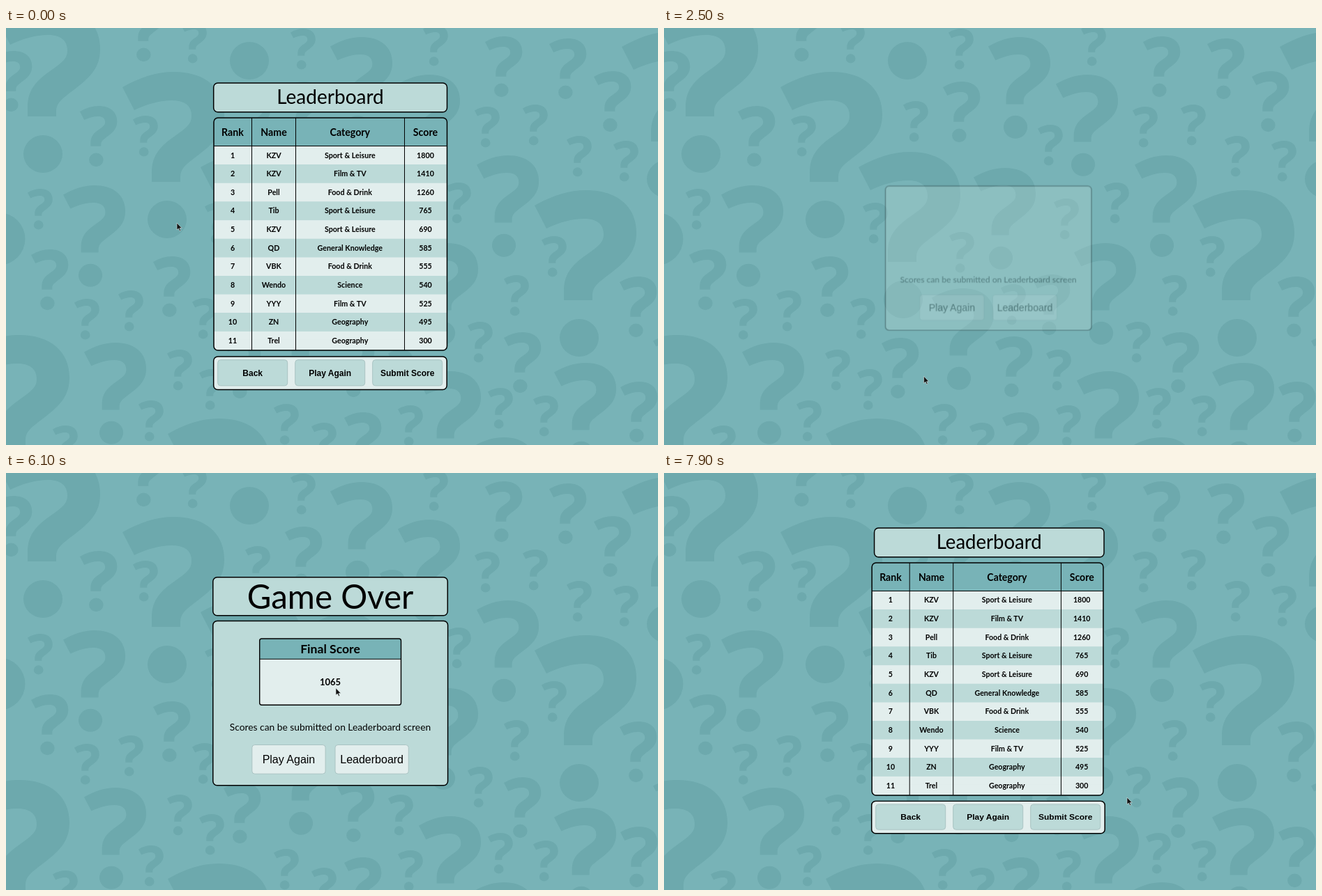
Recreate the animation shown at these times as an HTML page. Size 935 by 599 pixels, loop 8 s.

```html
<!DOCTYPE html>
<html lang="en">
<head>
<meta charset="utf-8">
<title>Quiz leaderboard</title>
<style>
  html, body { margin: 0; width: 100%; height: 100%; overflow: hidden; background: #78b3b7; }
  svg { display: block; position: absolute; left: 0; top: 0; overflow: hidden; }
  text { font-family: Lato, "Open Sans", sans-serif; text-anchor: middle; fill: #000; }
  .bold { font-weight: 700; }
  .ui { font-family: "Liberation Sans", Arial, sans-serif; }
  .moving { transform-box: fill-box; transform-origin: center; }
</style>
</head>
<body>
<svg id="stage" width="935" height="599" xmlns="http://www.w3.org/2000/svg"></svg>
<script>
const LOOP = 8000, STEP = 100;
const TEAL = '#78b3b7', SHADE = '#6da9ad', MINT = '#bcdad8', PALE = '#e2eeed', INK = '#000';
const stage = document.getElementById('stage');

function add(parent, tag, attrs = {}, text) {
  const el = document.createElementNS('http://www.w3.org/2000/svg', tag);
  for (const key in attrs) el.setAttribute(key, attrs[key]);
  if (text !== undefined) el.textContent = text;
  parent.appendChild(el);
  return el;
}
const group = (parent, cls = '') => add(parent, 'g', { class: cls });
const box = (parent, x, y, width, height, rx, fill, stroke = 'none', w = 1) =>
  add(parent, 'rect', { x, y, width, height, rx, fill, stroke, 'stroke-width': w });
const label = (parent, x, y, size, text, cls = '') =>
  add(parent, 'text', { x, y, 'font-size': size, class: cls }, text);
const line = (parent, d) => add(parent, 'path', { d, stroke: INK, 'stroke-width': 1, fill: 'none' });

// ---- Background of query glyphs, grouped by scale ----
const HOOK = 'M0 22C25 8 48 0 74 0C118 0 146 23 146 61C146 86 134 100 112 117' +
  'C90 134 83 138 83 152V158H42V145C42 120 54 107 74 93C94 79 99 74 99 63' +
  'C99 48 88 41 71 41C54 41 36 46 17 55Z';
const DOT = 'M36 212a28 27 0 1 0 56 0a28 27 0 1 0 -56 0Z';
const glyphs = [
  [1, '-11,-31 167,63 279,178 758,233 -55,441 232,561 285,-165 883,5'],
  [.61, '465,13 562,67 444,201 675,183 82,226 588,309 384,374 112,452 592,493 786,481 669,588'],
  [.365, '106,112 400,77 687,12 779,15 843,62 36,318 211,328 529,354 312,445 475,443 ' +
    '880,357 714,437 881,508 485,552 -16,33 174,-39'],
  [.245, '182,126 252,-8 408,1 598,-4 343,105 536,139 672,113 741,110 804,155 871,162 ' +
    '31,231 285,251 409,293 559,245 631,222 768,299 714,355 662,422 98,389 161,377 ' +
    '267,388 483,368 231,462 277,490 190,535 67,571 384,540 438,567 548,462 562,542 ' +
    '691,517 756,528 928,444']
];
box(stage, 0, 0, 935, 599, 0, TEAL);
for (const [scale, places] of glyphs)
  for (const place of places.split(' '))
    add(stage, 'path', { d: HOOK + DOT, fill: SHADE, transform: `translate(${place}) scale(${scale})` });
add(stage, 'circle', { cx: -10, cy: 303, r: 37.5, fill: SHADE });

// ---- Buttons with a hover state ----
function button(parent, x, y, w, h, fill, size, text, cls) {
  const face = box(parent, x, y, w, h, 4, fill, '#a9c3c2');
  label(parent, x + w / 2, y + h / 2 + size * .36, size, text, cls);
  return {
    hover(on) {
      face.setAttribute('fill', on ? TEAL : fill);
      face.setAttribute('stroke', on ? '#1d2b2c' : '#a9c3c2');
    },
    contains: (px, py) => px >= x && px <= x + w && py >= y && py <= y + h
  };
}

// ---- Leaderboard screen ----
const board = group(stage);
const boardTitle = group(board, 'moving');
box(boardTitle, 297.7, 79, 334.8, 41.7, 6, MINT, INK, 1.5);
label(boardTitle, 465, 109, 28, 'Leaderboard');

const table = group(board, 'moving');
const columns = [325, 384, 493.3, 601.5];
const rows = [
  ['KZV', 'Sport & Leisure', 1800], ['KZV', 'Film & TV', 1410], ['Pell', 'Food & Drink', 1260],
  ['Tib', 'Sport & Leisure', 765], ['KZV', 'Sport & Leisure', 690], ['QD', 'General Knowledge', 585],
  ['VBK', 'Food & Drink', 555], ['Wendo', 'Science', 540], ['YYY', 'Film & TV', 525],
  ['ZN', 'Geography', 495], ['Trel', 'Geography', 300]
];
const ROW = 26.64, TOP = 169.5;
box(table, 298, 129, 334.5, 334, 6, TEAL);
['Rank', 'Name', 'Category', 'Score'].forEach((t, i) => label(table, columns[i], 154.6, 14.2, t, 'bold'));
rows.forEach((row, i) => {
  const y = TOP + i * ROW;
  box(table, 298, y, 334.5, ROW + (i < 10 ? .4 : 0), i < 10 ? 0 : 5, i % 2 ? MINT : PALE);
  if (i === 10) box(table, 298, y, 334.5, 12, 0, PALE);
  [i + 1, ...row].forEach((t, c) => label(table, columns[c], y + 17, 10.7, t, 'bold'));
});
line(table, 'M298 169.5H632.5M352.5 129V463M415.5 129V463M571.5 129V463');
box(table, 298, 129, 334.5, 334, 6, 'none', INK, 1.5);

const actions = group(board, 'moving');
box(actions, 297.7, 472, 334.5, 47.5, 6, PALE, INK, 1.5);
const boardButtons = ['Back', 'Play Again', 'Submit Score'].map((t, i) =>
  button(actions, 303.7 + i * 111, 476.8, 100, 37, MINT, 12, t, 'ui bold'));

// ---- Game over screen ----
const over = group(stage);
const overTitle = group(over, 'moving');
box(overTitle, 296.8, 149.8, 336.5, 55, 6, MINT, INK, 1.5);
label(overTitle, 465, 194.5, 47.5, 'Game Over');

const panel = group(over, 'moving');
box(panel, 296.8, 212.5, 336.8, 236.2, 6, MINT, INK, 1.5);
const score = group(panel);
box(score, 363.7, 238, 202.8, 95.3, 3, PALE);
add(score, 'path', { d: 'M363.7 267V241a3 3 0 0 1 3 -3H563.5a3 3 0 0 1 3 3V267Z', fill: TEAL });
line(score, 'M364 267.3H566.5');
box(score, 363.7, 238, 202.8, 95.3, 3, 'none', INK, 1.4);
label(score, 465, 259, 17.6, 'Final Score', 'bold');
label(score, 465, 304.6, 13, '1065', 'bold');
label(panel, 465, 370.3, 13.8, 'Scores can be submitted on Leaderboard screen');
const overButtons = ['Play Again', 'Leaderboard'].map((t, i) =>
  button(panel, 352.8 + i * 119.2, 390.5, 105.3, 41.7, PALE, 16, t, 'ui'));

// ---- Scrollbar and pointer ----
const scrollbar = group(stage);
box(scrollbar, 0, 590, 935, 9, 0, '#f1f1f1');
const thumb = box(scrollbar, 0, 591.2, 655, 6.8, 0, '#c0c0c0');

const pointer = group(stage);
const arrow = add(pointer, 'path', {
  d: 'M0 0V10L2.4 8L4 11.6L5.6 10.9L4.1 7.5H7.2Z',
  fill: '#111', stroke: '#dfe9e9', 'stroke-width': .6
});
const hand = add(pointer, 'path', {
  d: 'M-1 1C-1 -.4 1 -.4 1 1V5L5 5.8Q6 6 6 7.2L5.2 12H-.2L-3 8.2C-3.6 7 -2.2 6.4 -1 7.8Z',
  fill: '#fff', stroke: '#111', 'stroke-width': .9
});

// ---- Motion ----
const BOUNCE = 'cubic-bezier(.215,.61,.355,1)';
const ENTER = { delay: 7171, duration: 900 };
const FAR = 1860, UNIT = .62;

function animate(el, frames, timing) {
  const anim = el.animate(frames, { fill: 'both', ...timing });
  anim.pause();
  return anim;
}
// Slides in along one axis, overshooting and settling.
function slideIn(el, axis, from, over, squash) {
  const side = Math.sign(from);
  const steps = [
    [0, from, squash[0]], [.6, -side * over * UNIT, squash[1]], [.75, side * 10 * UNIT, squash[2]],
    [.9, -side * 5 * UNIT, squash[3]], [1, 0, 1]
  ];
  return animate(el, steps.map(([offset, move, size]) => ({
    offset, easing: BOUNCE, opacity: offset ? 1 : 0,
    transform: `translate${axis}(${move}px) scale${axis}(${size})`
  })), ENTER);
}
const boardAnims = [
  slideIn(boardTitle, 'X', -FAR, 25, [3, 1, .98, .985]),
  slideIn(table, 'X', FAR, 25, [3, 1, .98, .995]),
  slideIn(actions, 'Y', FAR, 20, [5, .9, .95, .985])
];
const popSteps = [.3, 1.1, .9, 1.03, .97, 1];
const overAnims = [
  animate(panel, popSteps.map((s, i) => ({
    offset: i / 5, easing: BOUNCE, transform: `scale(${s})`,
    ...(i === 0 ? { opacity: 0 } : i >= 3 ? { opacity: 1 } : {})
  })), { delay: 2450, duration: 750 }),
  animate(overTitle, [
    { offset: 0, opacity: 0, transform: `scale(.1) translateY(${-1000 * UNIT}px)`,
      easing: 'cubic-bezier(.55,.055,.675,.19)' },
    { offset: .6, opacity: 1, transform: `scale(.475) translateY(${60 * UNIT}px)`,
      easing: 'cubic-bezier(.175,.885,.32,1)' },
    { offset: 1, opacity: 1, transform: 'scale(1) translateY(0px)' }
  ], { delay: 2590, duration: 1000 }),
  animate(score, [{ opacity: 0 }, { opacity: 1 }], { delay: 3060, duration: 1640 })
];

// Pointer path: time, x, y
const path = [
  [0, 245, 280], [100, 254, 282], [500, 254, 282], [600, 263, 304], [700, 263, 304],
  [800, 267, 330], [900, 275, 374], [1000, 275, 374], [1400, 318, 440], [1700, 364, 490],
  [1900, 372, 497], [2400, 372, 497], [3200, 377, 523], [3400, 378, 530], [3700, 381, 520],
  [4000, 430, 478], [4400, 517, 414], [4500, 521, 412], [5000, 521, 412], [5500, 500, 362],
  [6100, 473, 309], [6400, 473, 309], [6800, 521, 411], [7000, 521, 411], [7300, 645, 463],
  [7900, 664, 466]
];
function pointerAt(t) {
  const i = path.findIndex(p => p[0] >= t);
  if (i <= 0) return (i ? path[path.length - 1] : path[0]).slice(1);
  const [a, b] = [path[i - 1], path[i]];
  const k = (t - a[0]) / (b[0] - a[0]);
  return [1, 2].map(n => a[n] + (b[n] - a[n]) * k);
}

// Cubic ease matching BOUNCE, used for the page overflow.
function bounceEase(x) {
  const curve = (s, a, b) => 3 * (1 - s) ** 2 * s * a + 3 * (1 - s) * s * s * b + s ** 3;
  let lo = 0, hi = 1;
  for (let i = 0; i < 20; i++) {
    const mid = (lo + hi) / 2;
    if (curve(mid, .215, .355) < x) lo = mid; else hi = mid;
  }
  return curve(lo, .61, 1);
}
function pageWidth(t) {
  const e = bounceEase(Math.min(1, Math.max(0, (t + 32 - ENTER.delay) / (ENTER.duration * .6))));
  return 465 + UNIT * (3000 * (1 - e) - 25 * e) + 168 * (3 - 2 * e);
}

const show = (el, on) => el.setAttribute('visibility', on ? 'visible' : 'hidden');

function render(t) {
  const first = t < 2000, entering = t >= ENTER.delay, playing = !first && t < 7100;
  show(board, first || entering);
  show(over, playing);
  for (const a of boardAnims) a.currentTime = first ? LOOP * 2 : t;
  for (const a of overAnims) a.currentTime = t;

  const width = pageWidth(t), scrolls = entering && width > 935;
  show(scrollbar, scrolls);
  if (scrolls) thumb.setAttribute('width', 935 * 935 / width);

  const [x, y] = pointerAt(t);
  const live = first ? boardButtons : playing && t > 3200 ? overButtons : [];
  let pointing = false;
  for (const b of [...boardButtons, ...overButtons]) {
    const on = live.includes(b) && b.contains(x, y);
    b.hover(on);
    pointing = pointing || on;
  }
  pointer.setAttribute('transform', `translate(${x} ${y})`);
  show(arrow, !pointing);
  show(hand, pointing);
}

const start = performance.now();
function tick() {
  const t = (performance.now() - start) % LOOP;
  render(Math.floor(t / STEP) * STEP);
  requestAnimationFrame(tick);
}
tick();
</script>
</body>
</html>
```
